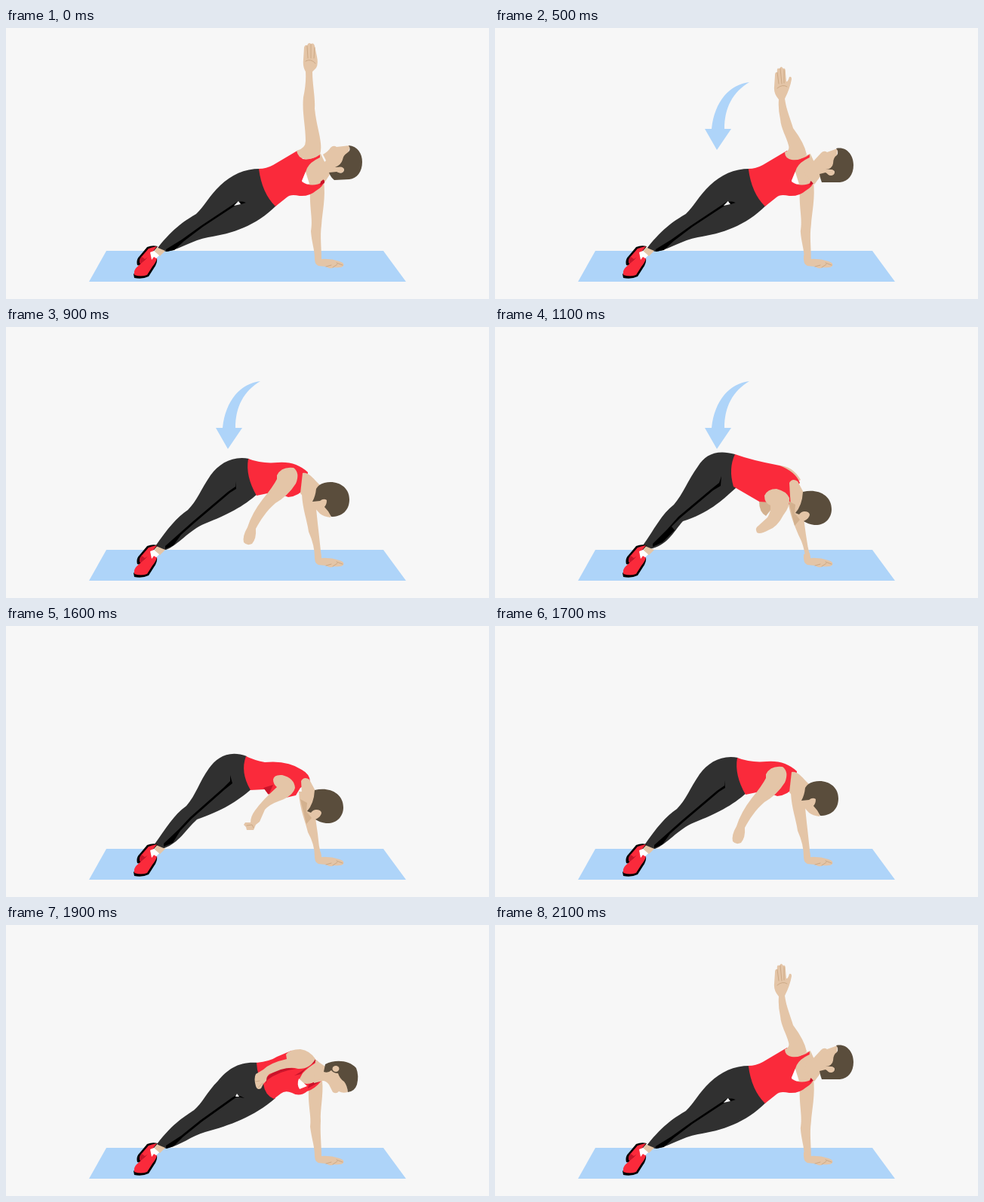
Recreate the animation shown at these times as an HTML page. Size 640 by 360 pixels, loop 2200 ms.

```html
<!DOCTYPE html>
<html lang="en">
<head>
<meta charset="utf-8">
<title>Side plank rotation</title>
<style>
html, body { margin: 0; width: 100%; height: 100%; overflow: hidden; background: #f7f7f7; }
svg { display: block; width: 100%; height: 100%; overflow: hidden; }
.mat { fill: #aed4f9; }
.skin { fill: #e4c5a7; }
.shade { fill: #d3b18f; }
.crease { fill: none; stroke: #c9a582; stroke-width: .9; stroke-linecap: round; }
.red { fill: #fa2a3b; }
.dark { fill: #c9142a; }
.pants { fill: #303030; }
.black { fill: #000; }
.hair { fill: #5a4d3c; }
.white { fill: #fff; }
.strip { animation: poses 2200ms step-end infinite; }
.arrow { fill: #aed4f9; animation: arrow 2200ms step-end infinite; }
/* Poses sit side by side, one stage width apart. */
@keyframes poses {
  0% { transform: translateX(0); }
  22.727%, 95.454% { transform: translateX(-640px); }
  27.272%, 90.909% { transform: translateX(-1280px); }
  31.818%, 86.363% { transform: translateX(-1920px); }
  36.363%, 81.818% { transform: translateX(-2560px); }
  40.909%, 77.272% { transform: translateX(-3200px); }
  45.454%, 72.727% { transform: translateX(-3840px); }
  50% { transform: translateX(-4480px); }
  100% { transform: translateX(0); }
}
@keyframes arrow {
  0%, 72.727%, 100% { visibility: hidden; }
  22.727% { visibility: visible; }
}
</style>
</head>
<body>
<svg viewBox="0 0 640 360">
<defs>
  <g id="feet">
    <path class="skin" d="M199 291L211 296L204 303L196 299Z"/>
    <path class="black" d="M174 315Q172 308 177 303L187 291Q194 288 201 290L192 301L186 308L178 316Z"/>
    <path class="dark" d="M177 312Q176 306 181 302L189 293L192 299L179 314Z"/>
    <path class="red" d="M180 304L189 293Q195 291 200 290L190 303L184 307Z"/>
    <path class="black" d="M169 327L188 308L200 306Q201 312 196 319L189 330Q181 334 170 332Z"/>
    <path class="red" d="M170 328Q169 322 173 318L181 311Q187 306 191 298L200 306Q199 311 194 317L187 328Q179 331 170 328Z"/>
    <path class="white" d="M191 298L196 296L203 302L199 306L196 304L193 308Z"/>
  </g>
  <g id="palm">
    <path class="skin" d="M409 302Q408 314 414 316L424 317Q430 321 434 318Q445 319 447 316Q449 312 442 310Q430 306 418 307L417 300Z"/>
    <path class="crease" d="M424 317L431 315M433 318L439 314M438 312L446 315"/>
  </g>
  <g id="highBody">
    <path class="skin" d="M403 216C402 240 407 254 404 270C405 285 409 294 409 306L418 307C418 290 416 276 418 262C419 245 424 225 421 203Z"/>
    <path class="pants" d="M337 187C315 187 299 195 284 209C269 223 263 237 252 247C239 255 223 264 201 292Q206 297 214 297C232 293 247 282 268 278C300 273 331 263 358 236Z"/>
    <path class="black" d="M318 232Q308 228 300 235L258 263L233 281L212 294V297L223 295L236 283L261 264L302 237Q306 232 312 234Z"/>
    <path class="white" d="M302 236L308 230L311 234Z"/>
    <path class="skin" d="M398 174L417 167L424 182L423 204L407 212L390 202Z"/>
    <path class="red" d="M335 187Q345 187 354 182L386 163L393 174Q405 176 416 168V172Q403 178 399 186L392 204Q405 213 421 204Q421 210 411 216Q402 224 389 223Q377 220 372 225L357 237Q339 219 335 187Z"/>
    <path class="white" d="M397 191L392 203Q397 208 402 207Z"/>
    <path class="dark" d="M417 204L422 200V206L416 209Z"/>
  </g>
  <g id="lowHead">
    <path class="skin" d="M391 206Q395 199 402 204L410 219L402 246L393 240Z"/>
    <path class="shade" d="M390 230L399 235L398 246L405 255L398 263Z"/>
    <path class="skin" d="M409 220Q399 243 398 247L411 258L424 255L418 226Z"/>
    <path class="hair" d="M409 218C428 213 447 222 447 241C447 254 437 263 424 262Q416 261 410 257Q418 253 418 248Q417 244 411 244Q407 244 404 248L399 246Q408 236 409 218Z"/>
  </g>
</defs>

<path class="mat" d="M133 296H500L530 337H110Z"/>
<path class="arrow" d="M337 72C311 75 291 97 287 134H278L294 162L313 134H304C304 106 315 85 337 72Z"/>

<g class="strip">
  <g>
    <use href="#highBody"/>
    <path class="skin" d="M385 163Q397 160 397 150C397 130 392 112 394 92Q398 73 397 58Q393 52 394 42L395 26Q396 22 399 23Q401 18 404 21Q408 19 409 24L412 38Q414 48 411 53L406 58C406 75 410 93 409 107C411 127 416 141 417 153Q418 162 416 168Q407 175 396 174Q387 173 385 163Z"/>
    <path class="crease" d="M399 24L400 40M404 22V40M409 26L408 40M397 44Q404 40 410 47"/>
    <path class="skin" d="M420 168Q427 164 430 159Q434 155 438 158L456 156L451 176L445 192L430 193L423 204L410 190L417 172L422 178L424 176Z"/>
    <path class="hair" d="M454 156C466 157 472 167 472 178C472 191 465 200 455 201L435 202Q430 198 428 192L438 191Q447 195 448 188Q447 184 436 185Q444 182 446 175Q447 169 452 166Q458 162 454 156Z"/>
    <ellipse class="skin" cx="443" cy="188.500" rx="5" ry="4"/>
  </g>

  <g transform="translate(640)">
    <use href="#highBody" x=".8"/>
    <path class="skin" d="M384 165Q391 163 389 156C386 144 379 134 378 121Q375 108 376 95Q369 87 370 78L371 63Q371 58 374 59Q373 52 377 54Q379 49 382 54Q385 52 385 60L386 71Q388 72 390 65Q393 64 393 68Q391 80 384 94C386 109 392 122 395 133Q410 153 413 168Q404 177 393 175Q384 173 384 165Z"/>
    <path class="crease" d="M374 59L376 74M378 54L380 74M383 56V73M374 80Q381 74 387 78"/>
    <path class="skin" d="M421 178L432 166Q436 162 440 165L454 160L451 185L446 195L432 196L423 208L410 193L415 173L420 181Z"/>
    <path class="hair" d="M452 160C466 157 475 169 475 182C475 195 468 204 457 205H433Q431 200 430 194L438 192Q448 199 450 191Q448 187 438 188Q447 187 448 180Q448 172 453 169Q456 164 452 160Z"/>
    <ellipse class="skin" cx="445" cy="192" rx="5" ry="4"/>
  </g>

  <g transform="translate(1280)">
    <path class="skin" d="M402 218C401 240 406 254 403 270C405 285 409 294 409 306L418 307C418 290 416 276 417 262C418 245 423 225 421 205Z"/>
    <path class="pants" d="M335 185C313 184 297 193 283 208C268 223 262 236 251 246C239 254 223 263 201 292Q206 297 214 297C232 293 247 281 267 277C300 270 331 259 357 233Z"/>
    <path class="black" d="M317 231Q308 226 300 232L258 261L232 281L212 294V297L223 295L235 283L261 262L302 234Q306 229 311 232Z"/>
    <path class="white" d="M302 233L307 228L309 231Z"/>
    <path class="skin" d="M394 176L413 173L424 190L421 206L403 214L388 205Z"/>
    <path class="red" d="M333 185Q345 186 354 181L382 165L390 177Q402 180 412 174L414 178Q399 185 394 196L390 206Q404 216 420 205Q417 215 407 220Q398 226 387 224Q376 219 371 224L357 234Q337 215 333 185Z"/>
    <path class="white" d="M393 198L390 207L389 214L401 211Z"/>
    <path class="skin" d="M382 167Q377 166 372 160L348 139Q338 134 334 123Q330 115 334 113L343 118Q353 127 358 135L381 149Q400 154 411 174Q401 184 390 181Q382 177 382 167Z"/>
    <path class="skin" d="M411 178L422 183Q426 173 437 172L452 172L456 196Q448 212 435 209Q426 207 423 202L420 207Z"/>
    <path class="hair" d="M431 173C449 164 471 174 471 191C471 204 464 212 453 214Q457 201 452 195Q447 187 437 183Q429 182 424 184Z"/>
  </g>

  <g transform="translate(1920)">
    <path class="skin" d="M401 219C400 240 405 255 403 268C405 284 409 294 409 306L418 307C418 290 416 276 417 260C416 245 421 225 419 207Z"/>
    <path class="pants" d="M334 183C309 181 294 191 281 207C266 222 260 237 249 246C239 253 222 262 200 291Q205 296 213 297C231 293 246 280 264 275C297 266 328 255 357 230L345 213Z"/>
    <path class="black" d="M316 230Q307 224 300 229L258 259L232 280L212 293V297L222 294L234 282L260 261L302 231Q306 227 310 229Z"/>
    <path class="white" d="M304 228L306 224L309 228Z"/>
    <path class="skin" d="M393 178L411 179L423 190L419 207L402 217L386 207Z"/>
    <path class="red" d="M332 183Q350 181 359 175L378 167L410 179L412 182Q399 190 393 197L387 208Q401 215 416 205L418 207Q409 218 399 221Q389 229 379 223Q370 219 364 224L355 231Q343 226 341 211Q333 201 332 183Z"/>
    <path class="white" d="M388 204L399 214L389 218Q385 212 388 204Z"/>
    <path class="dark" d="M409 178L412 181Q398 188 391 198L382 200Q401 190 409 178ZM401 212L416 205L418 207L400 217ZM384 191Q362 194 346 206L344 211V203L364 189Z"/>
    <path class="skin" d="M371 172Q376 165 390 165Q403 167 410 178Q402 192 387 191Q378 188 364 192L349 198Q345 201 345 207L341 211L338 217Q333 220 331 214Q328 204 331 198L341 192Q350 183 372 178Z"/>
    <path class="crease" d="M331 208L336 207M334 216L340 210"/>
    <path class="skin" d="M410 179L423 188L441 185L450 207L453 222Q446 224 441 221Q438 225 433 222L428 212Q424 207 420 207L408 210Z"/>
    <path class="hair" d="M421 195L423 185C437 178 455 180 464 190Q468 200 465 212Q462 221 453 222Q452 213 448 208Q442 204 440 197Q434 197 431 193Q427 197 421 195Z"/>
    <ellipse class="skin" cx="437" cy="191" rx="4.500" ry="4"/>
  </g>

  <g transform="translate(2560)">
    <path class="skin" d="M397 222C397 240 402 255 402 270C405 285 409 294 409 306L418 307C419 292 416 276 416 262Q413 247 414 222Z"/>
    <path class="shade" d="M397 221L414 222L413 237Q405 226 397 231Z"/>
    <path class="pants" d="M328 179C301 175 285 187 272 203C259 220 254 236 242 245C231 252 218 264 199 291Q204 296 212 296C230 292 244 274 264 268C297 258 320 249 342 229Z"/>
    <path class="black" d="M311 209L309 218Q300 222 296 226L252 262L230 278L212 291V295L222 291L232 281L254 264L299 228Q306 222 313 222Z"/>
    <path class="skin" d="M384 178L403 184L418 198L409 216L385 221L378 204Z"/>
    <path class="red" d="M326 178Q340 183 355 180L381 172L401 180L404 185Q392 196 385 206L381 215L394 220L409 212L410 215Q401 223 391 224Q380 229 369 224L362 221L340 230Q322 206 326 178Z"/>
    <path class="white" d="M386 207L391 219L380 221Z"/>
    <path class="dark" d="M400 180L404 185Q391 197 384 208L380 220L393 220L409 212L410 215Q401 223 391 224Q380 229 369 224L364 221L383 203Z"/>
    <path class="skin" d="M364 190Q364 179 373 175Q388 168 401 181Q397 194 385 201C378 215 370 227 355 234C343 248 334 264 329 277Q331 284 328 291Q328 301 322 304Q322 309 317 307Q311 302 311 291Q315 282 316 276Q324 257 330 243Q340 225 369 193Z"/>
    <path class="crease" d="M315 293L316 304M320 294L321 304M324 290V299"/>
    <path class="skin" d="M403 183L418 199L436 202L441 222V241Q434 240 430 237Q425 240 420 235L415 226Q412 220 404 224L397 221Z"/>
    <path class="hair" d="M414 212L421 198C437 192 455 197 460 209Q462 222 457 233Q450 241 440 241Q441 235 438 230Q440 222 430 215L429 210Q421 213 414 212Z"/>
    <ellipse class="skin" cx="433" cy="208.500" rx="5.500" ry="4"/>
  </g>

  <g transform="translate(3200)">
    <path class="skin" d="M392 222C393 242 399 257 401 272Q409 290 409 306L418 307Q415 278 413 261L409 222Z"/>
    <path class="pants" d="M322 175C300 171 283 181 271 197C258 216 253 231 241 243C226 253 214 268 198 291Q203 296 212 296C228 290 242 270 264 261C294 249 314 239 334 221Z"/>
    <path class="black" d="M304 205V212L294 219L248 258L230 274L211 291V295L222 290L232 276L250 260L297 220L305 215Z"/>
    <path class="red" d="M321 175Q339 182 360 180Q384 178 400 193L398 212Q388 225 374 226L356 219L332 224Q317 198 321 175Z"/>
    <path class="skin" d="M393 194Q402 192 414 210L405 237L390 221Z"/>
    <path class="skin" d="M359 197Q365 185 381 187Q390 194 384 208Q374 224 357 234C345 244 337 257 331 268Q332 281 326 288Q319 291 315 286Q313 278 320 266Q326 247 340 229Q354 212 359 202Z"/>
    <path class="skin" d="M407 201L418 212L433 232L430 253Q421 252 416 248L406 237L399 230Z"/>
    <path class="hair" d="M411 215Q414 209 422 207C440 203 455 213 455 229C455 244 445 252 431 252Q428 245 422 239Q425 236 425 230Q421 227 416 231L406 232Q410 225 411 215Z"/>
  </g>

  <g transform="translate(3840)">
    <path class="skin" d="M388 220C389 244 397 260 400 274Q409 290 409 306L418 307Q414 292 413 276L410 255L403 220Z"/>
    <path class="pants" d="M319 173C295 164 279 175 269 189C256 207 252 224 239 239C222 251 212 269 196 291Q201 296 210 295C229 288 238 271 253 257C287 245 305 234 326 216Z"/>
    <path class="black" d="M297 198V206L288 215L244 254L229 270L209 289V293L221 288L231 272L246 256L290 217L300 209Z"/>
    <path class="red" d="M318 173Q328 178 343 181Q373 178 392 191Q403 197 403 207L390 215L384 225L371 228L347 223L343 217L324 218Q310 194 318 173Z"/>
    <path class="dark" d="M354 211L348 224L341 215Z"/>
    <use href="#lowHead"/>
    <path class="skin" d="M354 204Q355 197 366 198Q382 202 383 215Q380 226 363 232Q349 237 343 244L336 260L331 264L328 271H319L318 267L315 264L317 261L324 261Q324 253 330 245Q340 231 359 214Q354 210 354 204Z"/>
    <path class="crease" d="M319 265L326 264L328 268"/>
  </g>

  <g transform="translate(4480)">
    <path class="skin" d="M388 226C389 247 397 263 402 276Q410 291 411 306L418 307Q414 292 412 276L409 254L400 224Z"/>
    <path class="skin" d="M375 184Q394 184 405 203L397 208Z"/>
    <path class="pants" d="M318 169C293 162 278 170 269 185C256 203 249 222 237 236C221 248 211 269 196 290Q201 296 209 294C230 288 238 270 249 258C283 247 299 232 319 214Z"/>
    <path class="black" d="M300 198L297 207L287 215L243 252L228 269L209 288V292L222 286L238 270L234 265L245 254L289 217L299 211Z"/>
    <path class="red" d="M318 169Q340 177 377 184Q398 192 404 207L395 219L393 235L372 237L352 233L316 212Q309 188 318 169Z"/>
    <use href="#lowHead" x="-1" y="1"/>
    <path class="shade" d="M350 232Q350 246 359 251L367 241L366 233Z"/>
    <path class="skin" d="M357 224Q361 215 373 215Q386 218 390 227Q391 239 382 250Q374 266 362 270Q351 276 347 273Q344 267 349 264L361 253Q366 245 365 237Q357 234 357 224Z"/>
  </g>
</g>
<use href="#feet"/>
<use href="#palm"/>
</svg>
</body>
</html>
```
